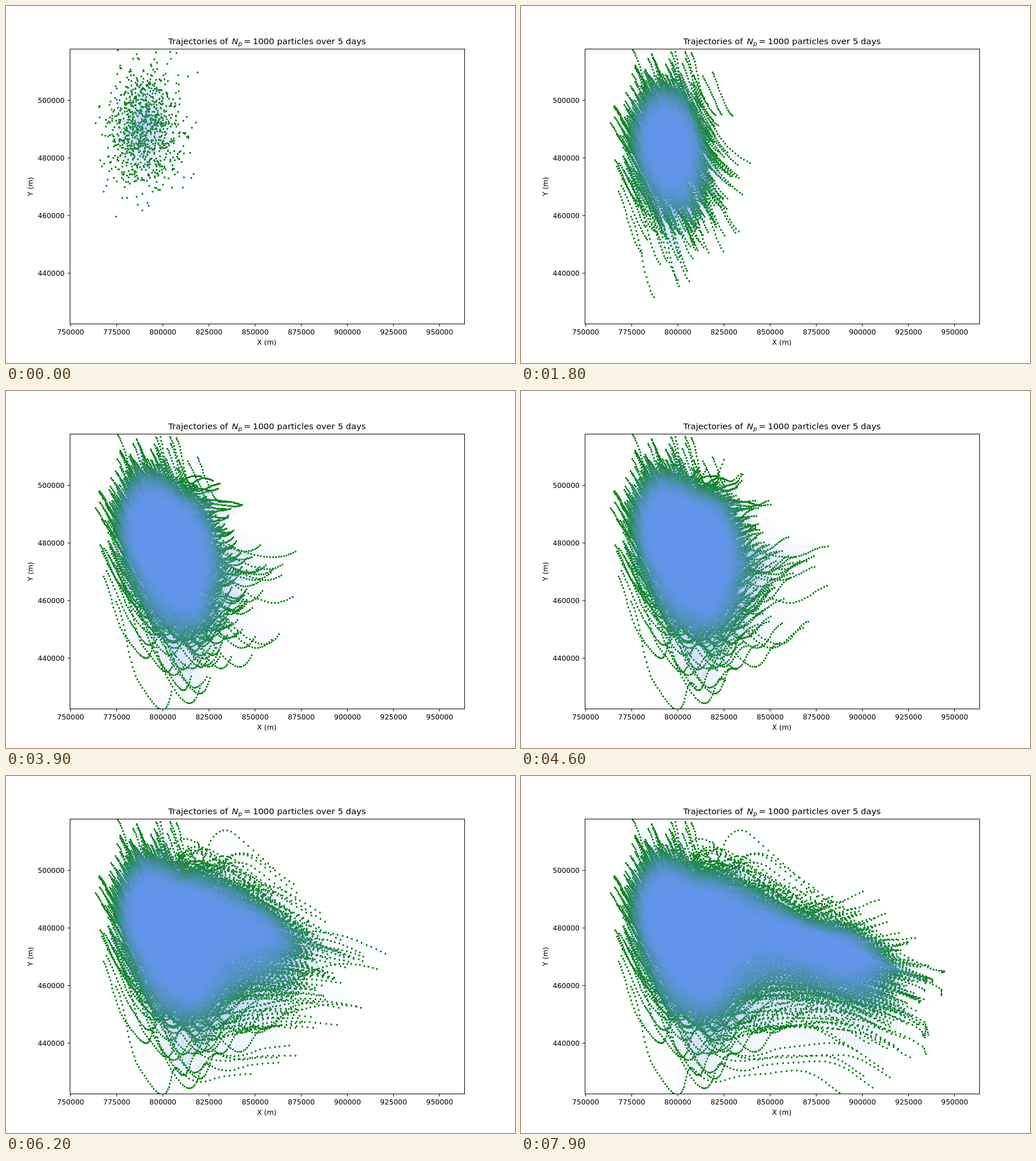
Animation of 894x626 px, one loop 8 s. Source, as an HTML page with a canvas:

```html
<!DOCTYPE html>
<html lang="en">
<head>
<meta charset="utf-8">
<title>Particle trajectories</title>
<style>
  html, body { margin: 0; width: 100%; height: 100%; overflow: hidden; background: #fff; }
  canvas, svg { position: absolute; left: 0; top: 0; width: 894px; height: 626px; }
  text { font-family: "DejaVu Sans", sans-serif; font-size: 12.42px; fill: #000; }
  .title { font-size: 14.9px; }
  .sub { font-size: 10.43px; }
  .it { font-style: italic; }
</style>
</head>
<body>
<canvas id="dots" width="894" height="626"></canvas>
<canvas id="links" width="894" height="626"></canvas>
<svg id="axes" viewBox="0 0 894 626">
  <rect x="112.5" y="75.5" width="693" height="482" fill="none" stroke="#000"/>
  <path id="ticks" stroke="#000" fill="none"/>
  <text class="title" x="285" y="67">Trajectories of</text>
  <text class="title it" x="396.7" y="67">N</text>
  <text class="sub it" x="408" y="69.5">p</text>
  <text class="title" x="417.5" y="67">=</text>
  <text class="title" x="632" y="67" text-anchor="end">1000 particles over 5 days</text>
  <text x="458" y="594" text-anchor="middle">X (m)</text>
  <text transform="translate(47 316.5) rotate(-90)" text-anchor="middle">Y (m)</text>
</svg>
<script>
const STEPS = 80, STEP_MS = 100, COUNT = 1000;
const BLUE = "rgb(100,149,237)";

// Axis ticks and labels
const axes = document.getElementById("axes");
let tickPath = "";
function label(str, x, y, anchor) {
  const el = document.createElementNS("http://www.w3.org/2000/svg", "text");
  el.setAttribute("x", x);
  el.setAttribute("y", y);
  el.setAttribute("text-anchor", anchor);
  el.textContent = str;
  axes.append(el);
}
for (let i = 0; i < 9; i++) {
  const x = 113.5 + 81.03 * i;
  tickPath += `M${Math.floor(x) + 0.5} 557.5v4.4`;
  label(750000 + 25000 * i, x, 576, "middle");
}
for (let i = 0; i < 4; i++) {
  const y = 165.5 + 101 * i;
  tickPath += `M112.5 ${y}h-4.4`;
  label(500000 - 20000 * i, 103, y + 4.5, "end");
}
document.getElementById("ticks").setAttribute("d", tickPath);

// Path of the cloud: step, centre x, centre y, vertical spread
const PATH = [
  [0, 243, 214, 50],
  [18, 280, 274, 58],
  [32, 316, 293, 69],
  [46, 350, 266, 57],
  [54, 402, 265, 45],
  [62, 470, 285, 34],
  [70, 537, 308, 25],
  [79, 598, 318, 35]
];

// Cubic Hermite blend along the path
function cloudAt(t) {
  const last = PATH.length - 1;
  let i = 0;
  while (i < last - 1 && t > PATH[i + 1][0]) i++;
  const span = PATH[i + 1][0] - PATH[i][0], s = (t - PATH[i][0]) / span;
  const slope = (k, c) => {
    const a = PATH[Math.max(0, k - 1)], b = PATH[Math.min(last, k + 1)];
    return (b[c] - a[c]) / (b[0] - a[0]) * span;
  };
  const h = s * s * (3 - 2 * s);
  return [1, 2, 3].map(c =>
    PATH[i][c] * (1 - h) + PATH[i + 1][c] * h +
    slope(i, c) * s * (1 - s) ** 2 - slope(i + 1, c) * s * s * (1 - s));
}

let seed = 20417;
function rand() {
  seed = (seed + 0x6D2B79F5) | 0;
  let r = Math.imul(seed ^ (seed >>> 15), 1 | seed);
  r = (r + Math.imul(r ^ (r >>> 7), 61 | r)) ^ r;
  return ((r ^ (r >>> 14)) >>> 0) / 4294967296;
}
const gauss = () => Math.sqrt(-2 * Math.log(1 - rand())) * Math.cos(2 * Math.PI * rand());
function ramp(t, from, to) {
  const s = Math.min(1, Math.max(0, (t - from) / (to - from)));
  return s * s * (3 - 2 * s);
}

const particles = Array.from({ length: COUNT }, () => {
  const u = gauss(), v = gauss();
  return {
    u, v,
    lead: Math.max(0, u - 1.2) ** 2 * Math.exp(-((v - 0.6) ** 2) / 1.5),
    phase: rand() * 2 * Math.PI,
    dx: gauss() * 8, dy: gauss() * 8
  };
});

function place(p, t, [cx, cy, sy]) {
  const { u, v } = p, early = ramp(t, 0, 18), drift = t / STEPS;
  let x = cx + (31 + 0.0016 * t * t) * u + 0.14 * t * v;
  if (x > 690) x = 690 + (x - 690) * 0.25;
  x += p.lead * 45 * Math.sin(Math.PI * t / 100) ** 2;
  // The lower side stretches early, both tails lengthen later
  let y = cy + sy * v + 0.18 * t * u + 6 * early * v * v + 3 * ramp(t, 40, 54) * v ** 3;
  x += early * 4 * Math.sin(0.15 * t + p.phase) + p.dx * drift;
  y += early * 5 * Math.cos(0.13 * t + p.phase) + p.dy * drift;
  return [x, y];
}

function layer(id) {
  const ctx = document.getElementById(id).getContext("2d");
  ctx.beginPath();
  ctx.rect(112, 75, 693, 482);
  ctx.clip();
  return ctx;
}
const dots = layer("dots"), links = layer("links");
dots.fillStyle = "#008000";
links.strokeStyle = links.fillStyle = BLUE;

function addStep(t) {
  const cloud = cloudAt(t), pts = particles.map(p => place(p, t, cloud));
  dots.beginPath();
  for (const [x, y] of pts) {
    const cx = Math.floor(x) + 0.5, cy = Math.floor(y) + 0.5;
    dots.moveTo(cx + 1.65, cy);
    dots.arc(cx, cy, 1.65, 0, 2 * Math.PI);
  }
  dots.fill();
  // Each link is stroked alone so that crossings build up
  links.globalAlpha = 0.055;
  for (let i = 1; i < COUNT; i++) {
    links.beginPath();
    links.moveTo(...pts[i - 1]);
    links.lineTo(...pts[i]);
    links.stroke();
  }
  // Restore the pure hue that rounding shifts, keeping the opacity
  links.globalAlpha = 1;
  links.globalCompositeOperation = "source-in";
  links.fillRect(0, 0, 894, 626);
  links.globalCompositeOperation = "source-over";
}

let drawn = 0;
function show(step) {
  if (step + 1 < drawn) {
    dots.clearRect(0, 0, 894, 626);
    links.clearRect(0, 0, 894, 626);
    drawn = 0;
  }
  while (drawn <= step) addStep(drawn++);
}

const start = performance.now();
function tick() {
  show(Math.floor((performance.now() - start) / STEP_MS) % STEPS);
  requestAnimationFrame(tick);
}
tick();
</script>
</body>
</html>
```
